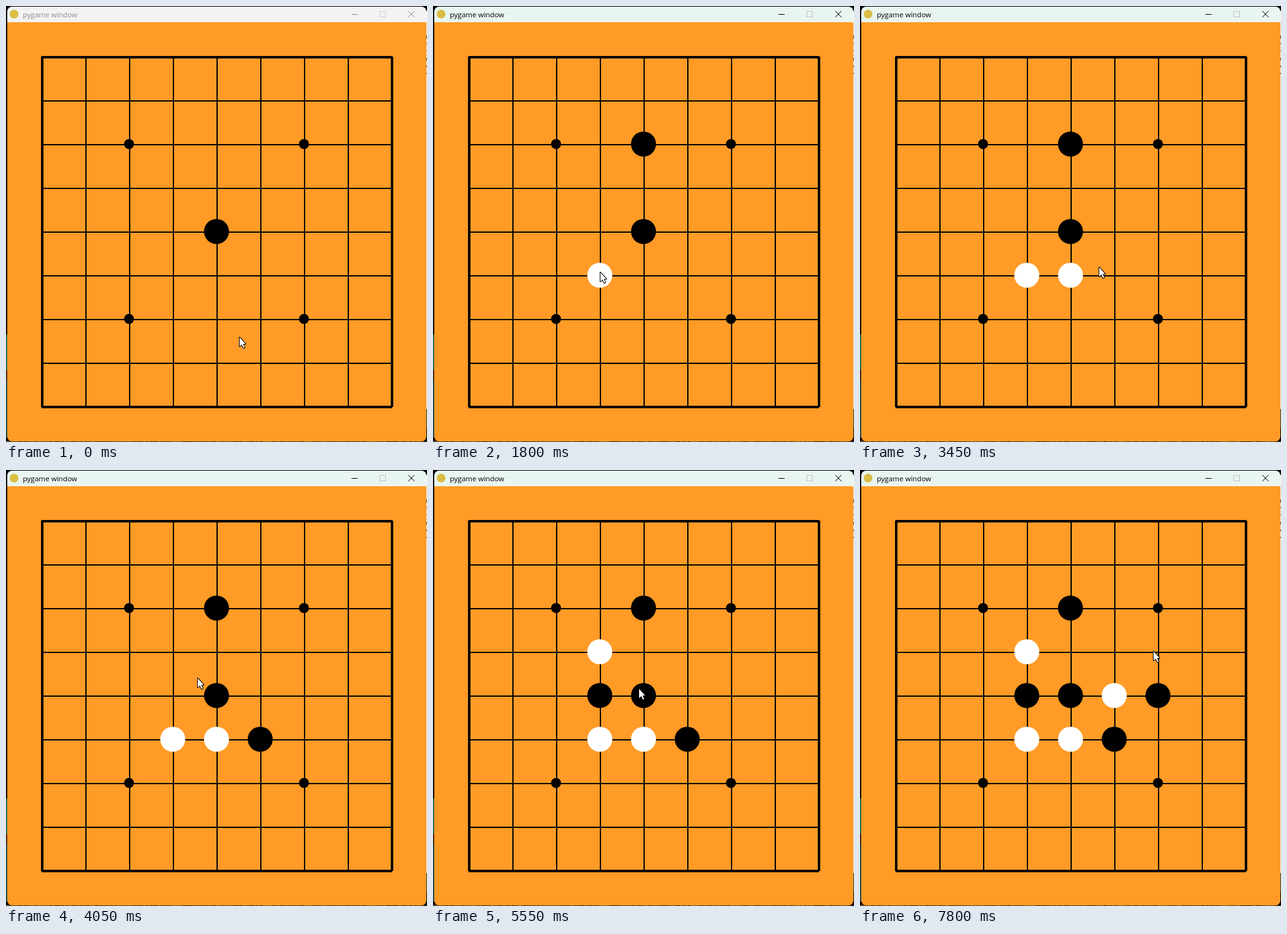
Recreate the animation shown at these times as an HTML page with a canvas. Size 674x698 px, loop 8000 ms.

```html
<!DOCTYPE html>
<html lang="en">
<head>
<meta charset="utf-8">
<title>Board game</title>
<style>
html, body { margin: 0; width: 100%; height: 100%; overflow: hidden; background: #000; }
canvas { display: block; }
</style>
</head>
<body>
<canvas id="stage" width="674" height="698"></canvas>
<script>
const ctx = document.getElementById('stage').getContext('2d');
const LOOP = 8000, STEP = 50, REPLY = 800, FOCUS = 750;
const CELL = 70, LEFT = 57, TOP = 81;

// White plays at the given time, black answers after REPLY
const turns = [
  { time: 1000, white: [3, 5], black: [4, 2] },
  { time: 2850, white: [4, 5], black: [5, 5] },
  { time: 4400, white: [3, 3], black: [3, 4] },
  { time: 6150, white: [5, 4], black: [6, 4] }
];

// Pointer moves: start, end and where the tip arrives
const moves = [
  [0, 500, 267, 425],
  [2250, 2700, 335, 426],
  [2900, 3200, 382, 417],
  [3800, 4200, 271, 293],
  [4450, 4750, 295, 336],
  [5350, 5550, 329, 349],
  [5550, 5700, 405, 367],
  [7150, 7600, 469, 289]
];

const mix = (a, b, k) => a + (b - a) * k;
const progress = (t, start, end) => Math.max(0, Math.min(1, (t - start) / (end - start)));
const ease = k => k * k * (3 - 2 * k);

function rect(color, x, y, w, h) {
  ctx.fillStyle = color;
  ctx.fillRect(x, y, w, h);
}

function disc(color, x, y, r) {
  ctx.fillStyle = color;
  ctx.beginPath();
  ctx.arc(x, y, r, 0, 7);
  ctx.fill();
}

const piece = (color, [col, row], r = 20) =>
  disc(color, LEFT + col * CELL, TOP + row * CELL, r);

function pointerAt(t) {
  let x = 373, y = 529;
  for (const [start, end, toX, toY] of moves) {
    const k = ease(progress(t, start, end));
    x = mix(x, toX, k);
    y = mix(y, toY, k);
  }
  return [Math.round(x), Math.round(y)];
}

// Slivers of the desktop around the window
function drawDesktop() {
  let seed = 7;
  const random = () => (seed = seed * 16807 % 2147483647) / 2147483647;
  rect('#000', 0, 0, 674, 698);
  rect('#2c6a52', 0, 526, 2, 57);
  rect('#4a2a1c', 0, 583, 2, 16);
  rect('#1f4a4c', 0, 599, 2, 92);
  rect('#f4f4f4', 672, 8, 2, 637);
  rect('#24413b', 672, 645, 2, 30);
  for (let y = 35; y < 115; y += 12) rect('#555', 673, y, 1, 6 * random());
  for (let x = 0; x < 674; x += 3) {
    const v = 20 + random() * 100;
    rect(`rgb(${v},${v * .75},${v * .55})`, x, 696, 3, 2);
  }
}

function drawTitle(t) {
  const active = t >= FOCUS, tint = progress(t, FOCUS, FOCUS + 300);
  const ink = active ? '#000' : '#8c8c8c';
  rect(`rgb(${mix(243, 233, tint)},${mix(243, 246, tint)},${mix(243, 239, tint)})`, 2, 1, 671, 25);
  disc('#d9bd45', 13, 13, 7);
  ctx.fillStyle = ink;
  ctx.font = '11.5px "Open Sans", "Noto Sans", sans-serif';
  ctx.fillText('pygame window', 27, 18);
  ctx.lineWidth = 1;
  ctx.strokeStyle = active ? '#bcc2be' : '#d0d0d0';
  ctx.strokeRect(598.5, 8.5, 9, 9);
  ctx.strokeStyle = ink;
  ctx.beginPath();
  ctx.moveTo(553, 13.5); ctx.lineTo(563, 13.5);
  ctx.moveTo(644, 8); ctx.lineTo(654, 18);
  ctx.moveTo(654, 8); ctx.lineTo(644, 18);
  ctx.stroke();
}

function drawBoard(t) {
  const size = 8 * CELL + 1;
  rect('#ff9b26', 2, 26, 671, 671);
  for (let i = 0; i < 9; i++) {
    const w = i % 8 ? 2 : 4, shift = i * CELL + 1 - w / 2;
    rect('#000', LEFT + shift, TOP, w, size);
    rect('#000', LEFT, TOP + shift, size, w);
  }
  for (const col of [2, 6])
    for (const row of [2, 6]) piece('#000', [col, row], 8);
  piece('#000', [4, 4]);
  for (const { time, white, black } of turns) {
    if (t >= time) piece('#fff', white);
    if (t >= time + REPLY) piece('#000', black);
  }
}

const arrow = new Path2D('M1 1.5V16L4.5 13 7 18.5 9 17.5 6.5 12H10.5Z');

function drawPointer(t) {
  ctx.save();
  ctx.translate(...pointerAt(t));
  ctx.lineJoin = 'round';
  ctx.lineWidth = 2;
  ctx.strokeStyle = '#000';
  ctx.stroke(arrow);
  ctx.fillStyle = '#fff';
  ctx.fill(arrow);
  ctx.restore();
}

function draw(now) {
  const t = Math.floor(now % LOOP / STEP) * STEP;
  drawDesktop();
  ctx.save();
  ctx.beginPath();
  ctx.roundRect(2, 1, 671, 696, 8);
  ctx.clip();
  drawTitle(t);
  drawBoard(t);
  ctx.restore();
  drawPointer(t);
}

const origin = performance.now();
function frame() {
  draw(performance.now() - origin);
  requestAnimationFrame(frame);
}
frame();
</script>
</body>
</html>
```
